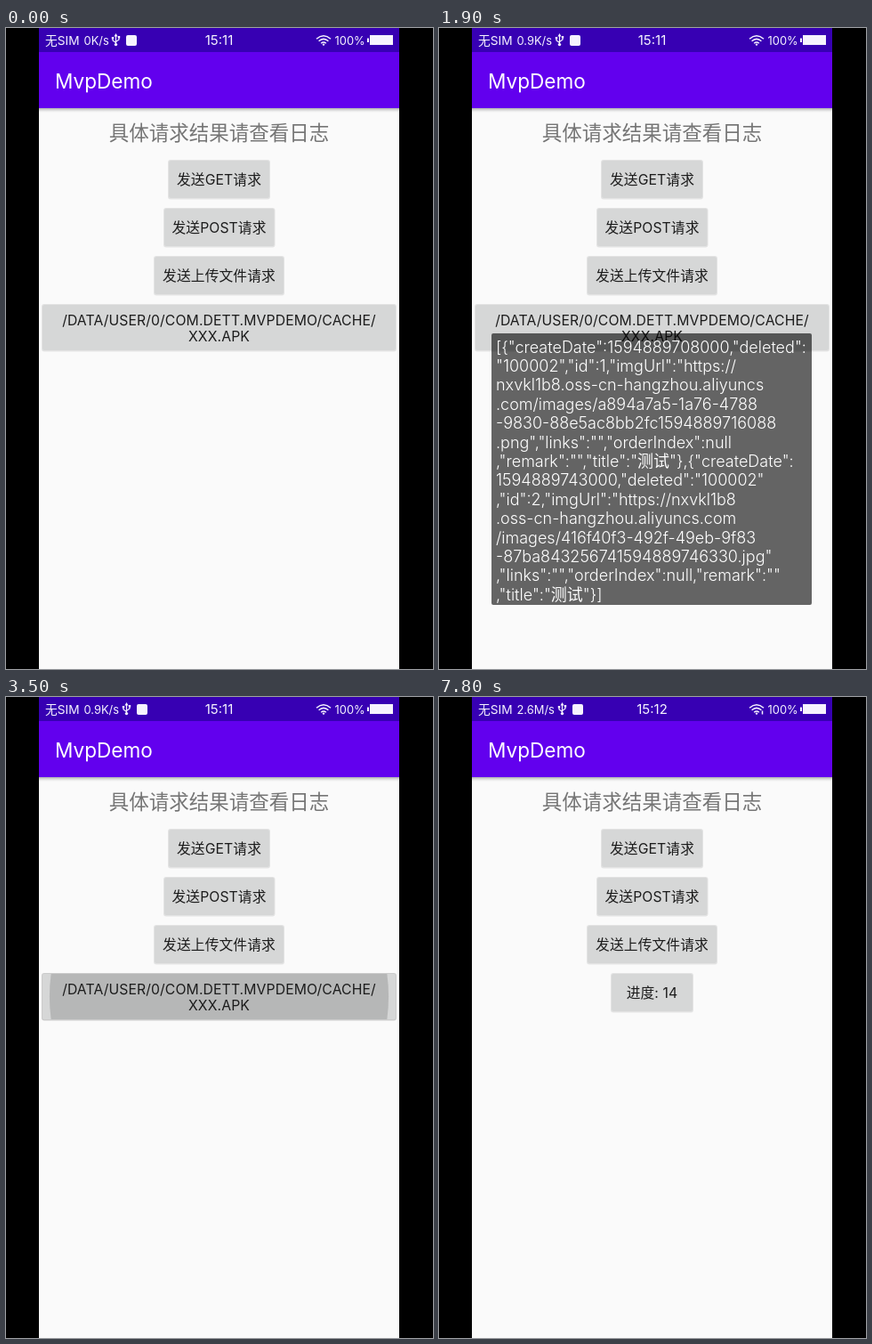
Write an HTML page that moves like this. It is 480x720 px and loops after 8000 ms.

```html
<!DOCTYPE html>
<html lang="zh-CN">
<head>
<meta charset="utf-8">
<title>MvpDemo</title>
<style>
  html, body { margin: 0; width: 100%; height: 100%; overflow: hidden; background: #000; }
  svg { display: block; width: 480px; height: 720px; }
  text { font-family: Inter, "Noto Sans CJK SC", "Noto Sans CJK JP", sans-serif; white-space: pre; }
  .status { fill: #f6f3ff; font-size: 12.9px; }
  .mid { text-anchor: middle; }
  .button rect { fill: #d6d7d7; }
  .button text { fill: #1c1c1c; font-size: 15.75px; letter-spacing: .1px; text-anchor: middle; }
  .button .halo { fill: #b8b8b8; opacity: .35; }
  .button .ripple { fill: #444; }
  #toast text { fill: #fff; font-size: 18px; font-weight: 300; }
</style>
</head>
<body>
<svg viewBox="0 0 480 720" xmlns="http://www.w3.org/2000/svg">
  <defs>
    <linearGradient id="shade" x2="0" y2="1">
      <stop stop-color="#8c8c8c" stop-opacity=".7"/>
      <stop offset="1" stop-color="#c8c8c8" stop-opacity="0"/>
    </linearGradient>
  </defs>
  <rect width="480" height="720"/>
  <rect x="37" width="405" height="720" fill="#fafafa"/>
  <rect x="37" y="90" width="405" height="5" fill="url(#shade)"/>
  <rect x="37" y="27" width="405" height="63" fill="#6200ee"/>
  <rect x="37" width="405" height="27" fill="#3700b3"/>

  <text class="status" x="44" y="18.8" style="font-size:13.7px">无SIM</text>
  <text class="status" id="speed" x="87.5" y="18.8"></text>
  <g id="icons" fill="none" stroke="#f6f3ff" stroke-width="1.2">
    <path d="M0 18V8M-3.5 11.5V14L0 16.5M3.5 10.5V13L0 15.5"/>
    <path d="M-2 9.5L0 6L2 9.5ZM-4.7 10h2.4v2.4h-2.4ZM2.3 9h2.4v2.4h-2.4Z" fill="#f6f3ff" stroke="none"/>
    <circle cy="18.6" r="1.7" fill="#f6f3ff" stroke="none"/>
    <rect x="11.5" y="8" width="12" height="12" rx="2" fill="#f6f3ff" stroke="none"/>
  </g>
  <text class="status mid" id="clock" x="239.5" y="19.2" style="font-size:15px"></text>
  <g fill="none" stroke="#f6f3ff" stroke-width="1.5">
    <path d="M349 12.2Q357 5.2 365 12.2M351.6 14.8Q357 10 362.4 14.8M354.2 17.2Q357 14.8 359.8 17.2"/>
    <circle cx="357" cy="18.6" r="1.2" fill="#f6f3ff" stroke="none"/>
    <path id="traffic" d="M363.5 15.5v4"/>
  </g>
  <text class="status" x="369.5" y="18.8">100%</text>
  <path d="M409 8h26v11h-26ZM406 11.5h2v4.5h-2Z" fill="#f6f3ff"/>

  <text x="55" y="68" fill="#fff" style="font-size:22.6px">MvpDemo</text>
  <text class="mid" x="239.5" y="125.5" fill="#757575" style="font-size:22.5px">具体请求结果请查看日志</text>
  <g id="buttons"></g>
  <g id="toast">
    <rect x="59" y="343" width="360" height="305" rx="2" fill-opacity=".6"/>
  </g>
</svg>
<script>
const LOOP = 8000, STEP = 100;
const $ = id => document.getElementById(id);
const clamp = v => Math.max(0, Math.min(1, v));

function add(parent, tag, attrs, content = "") {
  const node = document.createElementNS("http://www.w3.org/2000/svg", tag);
  for (const key in attrs) node.setAttribute(key, attrs[key]);
  node.textContent = content;
  return parent.appendChild(node);
}

function makeButton(id, x, y, width, height, lines) {
  const group = add($("buttons"), "g", { class: "button", id });
  const clip = add(group, "clipPath", { id: id + "-clip" });
  const box = { x, y, width, height, rx: 2 };
  add(clip, "rect", box);
  const halo = add(group, "rect", { class: "halo", x: x - 1, y: y - 1, width: width + 2, height: height + 2.5, rx: 3 });
  add(group, "rect", box);
  const ripple = add(group, "circle", {
    class: "ripple", cx: x + width / 2, cy: y + height / 2, r: 0, "clip-path": `url(#${id}-clip)`
  });
  const labels = lines.map((line, i) => add(group, "text", { x: 239.5, y: y + (lines.length > 1 ? 22.5 : 27) + i * 18.5 }, line));
  return { group, halo, ripple, labels, width };
}

const getButton = makeButton("get", 183, 149, 113, 42, ["发送GET请求"]);
makeButton("post", 178, 203, 123.5, 42, ["发送POST请求"]);
makeButton("upload", 167, 257, 145, 42, ["发送上传文件请求"]);
const fileButton = makeButton("file", 41, 311, 397, 51, ["/DATA/USER/0/COM.DETT.MVPDEMO/CACHE/", "XXX.APK"]);
const progressButton = makeButton("progress", 194, 311, 91, 42, [""]);

[
  '[{"createDate":1594889708000,"deleted":',
  '"100002","id":1,"imgUrl":"https://',
  'nxvkl1b8.oss-cn-hangzhou.aliyuncs',
  '.com/images/a894a7a5-1a76-4788',
  '-9830-88e5ac8bb2fc1594889716088',
  '.png","links":"","orderIndex":null',
  ',"remark":"","title":"测试"},{"createDate":',
  '1594889743000,"deleted":"100002"',
  ',"id":2,"imgUrl":"https://nxvkl1b8',
  '.oss-cn-hangzhou.aliyuncs.com',
  '/images/416f40f3-492f-49eb-9f83',
  '-87ba843256741594889746330.jpg"',
  ',"links":"","orderIndex":null,"remark":""',
  ',"title":"测试"}]'
].forEach((line, i) => add($("toast"), "text", { x: 64, y: 364.6 + i * 21.4 }, line));

// [start time, value, icon position]
const speeds = [[0, "0K/s", 123.5], [1200, "0.9K/s", 135.5], [4200, "552.5K/s", 150.5], [7100, "2.6M/s", 138.5]];
// Start time of each progress value, counting from 0
const progress = [3900, 4000, 4100, 4300, 4500, 4700, 4900, 6300, 6400, 6600, 7000, 7300, 7500, 7700, 7800];

function press(button, age) {
  const active = age >= 0 && age < 600;
  button.ripple.setAttribute("r", active ? button.width * .56 * clamp((age + 100) / 350) : 0);
  button.ripple.style.opacity = active ? .22 * (1 - clamp((age - 200) / 400)) : 0;
  button.halo.style.opacity = active ? .7 : .35;
}

function draw(time) {
  const t = Math.floor((time % LOOP) / STEP) * STEP;
  const [, speed, iconX] = speeds.filter(s => s[0] <= t).pop();
  $("speed").textContent = speed;
  $("icons").setAttribute("transform", `translate(${iconX} 0)`);
  $("clock").textContent = t < 5200 ? "15:11" : "15:12";
  $("traffic").style.opacity = t < 4200 ? 0 : 1;

  press(getButton, t - 100);
  press(fileButton, t - 3300);

  const value = progress.filter(p => p <= t).length - 1;
  fileButton.group.style.display = value < 0 ? "" : "none";
  progressButton.group.style.display = value < 0 ? "none" : "";
  progressButton.labels[0].textContent = "进度: " + value;

  const fadeIn = 1 - (1 - clamp((t - 700) / 400)) ** 3;
  const fadeOut = 1 - clamp((t - 2550) / 600);
  $("toast").style.opacity = fadeIn * fadeOut;
}

const start = performance.now();
function tick() {
  draw(performance.now() - start);
  requestAnimationFrame(tick);
}
tick();
</script>
</body>
</html>
```
